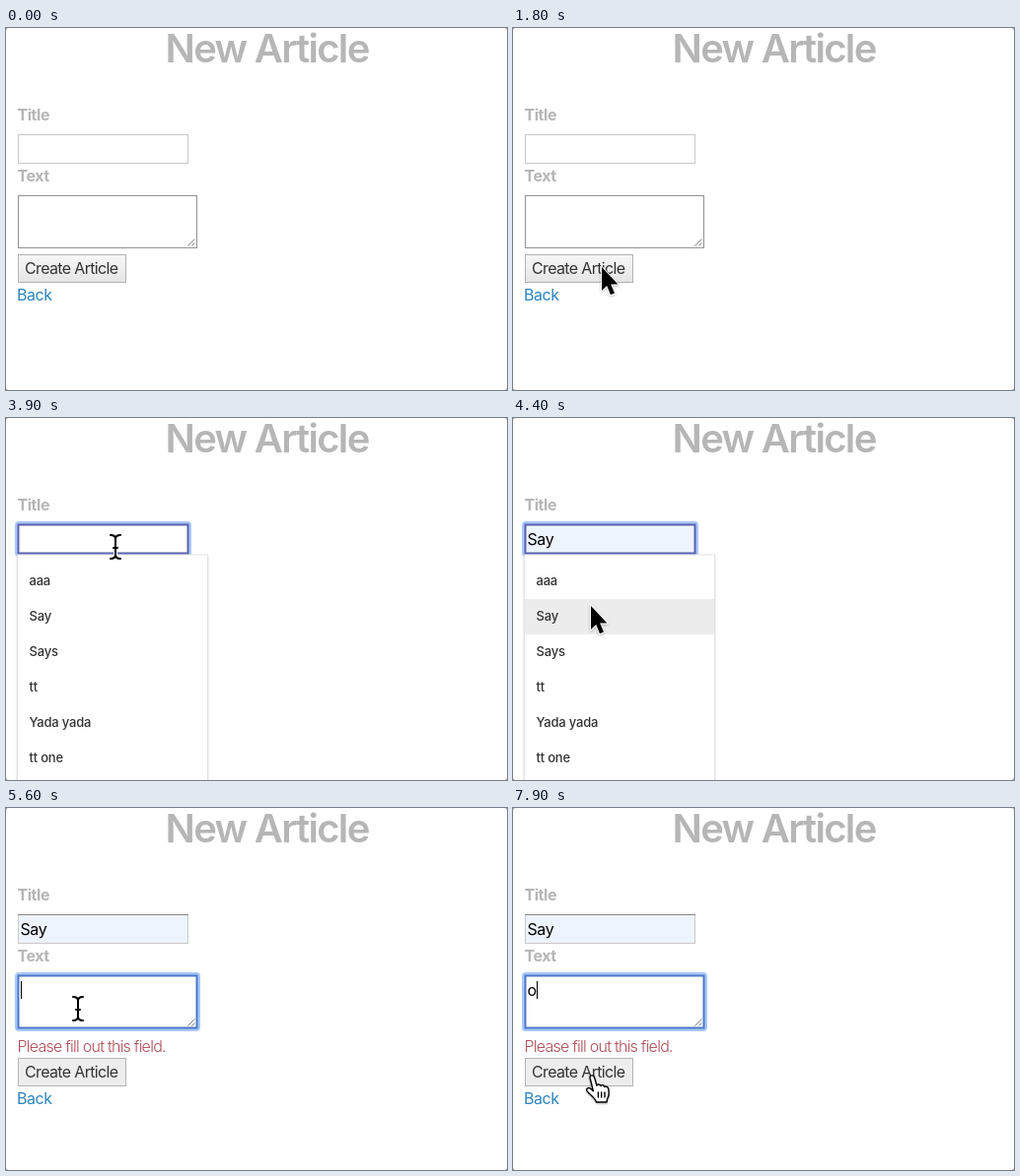
An HTML page that plays this animation: 508x368 px, repeating every 8000 ms.

```html
<!DOCTYPE html>
<html lang="en">
<head>
<meta charset="utf-8">
<title>New Article</title>
<style>
  html, body { margin: 0; width: 100%; height: 100%; overflow: hidden; background: #a6a6a6; }
  svg { display: block; width: 508px; height: 368px; }
  text { font: 16px Inter, "Open Sans", sans-serif; font-optical-sizing: none; white-space: pre; }
  .head { font-size: 40px; font-weight: 600; letter-spacing: -1.7px; fill: #b6b6b6; }
  .label { font-weight: 700; letter-spacing: -.45px; fill: #b6b6b6; }
  .error { font-weight: 300; letter-spacing: -.75px; fill: #b04c58; }
  .button { letter-spacing: -.65px; fill: #333; }
  .link { letter-spacing: -.45px; fill: #2b84bd; }
  .value { letter-spacing: -.4px; fill: #000; }
  .option { font-size: 13px; font-weight: 500; letter-spacing: -.2px; fill: #333; }
</style>
</head>
<body>
<svg viewBox="0 0 508 368">
  <defs>
    <linearGradient id="face" x2="0" y2="1">
      <stop stop-color="#f7f7f7"/><stop offset="1" stop-color="#e5e5e5"/>
    </linearGradient>
    <filter id="soft" x="-50%" y="-50%" width="200%" height="200%">
      <feDropShadow dx="0" dy="1" stdDeviation="1" flood-opacity=".3"/>
    </filter>
    <filter id="lift" x="-10%" y="-10%" width="120%" height="120%">
      <feDropShadow dx="0" dy="1" stdDeviation="1" flood-opacity=".16"/>
    </filter>
  </defs>
  <rect width="508" height="368" rx="3" fill="#fff"/>
  <text class="head" x="161.5" y="35">New Article</text>
  <text class="label" x="11.5" y="94">Title</text>

  <g id="title">
    <rect class="glow" x="10.5" y="106.5" width="176" height="33" rx="2.5" fill="none" stroke="#a9c8f6" stroke-width="3"/>
    <rect class="box" x="12.5" y="108.5" width="172" height="29"/>
    <path class="inset" d="M12 108.5H185" stroke="#858585"/>
    <text class="value" x="14.5" y="129"></text>
  </g>
  <text id="titleError" class="error" x="11.5" y="156">Please fill out this field.</text>

  <g id="textPart">
    <text class="label" x="11.5" y="156">Text</text>
    <rect class="glow" x="10.5" y="168.5" width="185" height="57" rx="2.5" fill="none" stroke="#a9c8f6" stroke-width="3"/>
    <rect class="box" x="12.5" y="170.5" width="181" height="53" fill="#fff"/>
    <path d="M184.5 221.5L191.5 214.5M188.5 221.5L191.5 218.5" stroke="#777" stroke-width=".9"/>
    <text class="value" x="14.5" y="191"></text>
    <path class="caret" stroke="#000"/>
    <text id="textError" class="error" x="11.5" y="248">Please fill out this field.</text>
  </g>

  <g id="actions">
    <rect class="box" x="12.5" y="230.5" width="109" height="28" stroke="#b3b3b3"/>
    <text class="button" x="19" y="250">Create Article</text>
    <text class="link" x="11" y="277">Back</text>
  </g>

  <g id="menu">
    <rect x="11.5" y="139" width="193" height="240" fill="#fff" stroke="#dedede" stroke-width=".8" filter="url(#lift)"/>
    <rect id="hover" x="12" width="192" height="36" fill="#ececec"/>
  </g>

  <g id="arrow" filter="url(#soft)">
    <path d="M0 0V24L5.2 19 9 28.3 13 26.6 9.2 17.5H16.4Z" stroke="#fff" stroke-width="1.8" paint-order="stroke"/>
  </g>
  <g id="beam" fill="none" stroke-linecap="round">
    <path stroke="#fff" stroke-width="4"/>
    <path stroke="#000" stroke-width="2"/>
  </g>
  <g id="hand" filter="url(#soft)" stroke="#000" stroke-width="1.4" stroke-linejoin="round" stroke-linecap="round">
    <path fill="#fff" d="M-2 2C-2.2-.6 1.6-1 2.5 1.8L5 10.2C5.6 8.4 8.4 8.6 8.9 10.6 9.8 9 12.3 9.4 12.7 11.5 14 10.4 16.6 11.4 16.9 14L17.2 18.5C17.2 22 15 23.5 15 27H4.5C4 23.5-1.6 20-5 15.6-6.2 13-3.4 11.4-1 13.6L1.4 15.8Z"/>
    <path fill="none" d="M6.4 17V22M9.7 17V22M13 17V22"/>
  </g>
</svg>
<script>
const LOOP = 8000, STEP = 100;
const OPTIONS = ['aaa', 'Say', 'Says', 'tt', 'Yada yada', 'tt one'];
const ROW_TOP = 148, ROW = 36;
const $ = q => document.querySelector(q);
const show = (el, on) => el.setAttribute('visibility', on ? 'inherit' : 'hidden');
const set = (el, attrs) => { for (const k in attrs) el.setAttribute(k, attrs[k]); };

// Pointer stops: time, x, y, shape from that time on
const PATH = [
  [800, 201, 345, 'arrow'], [900, 160, 305, 'arrow'], [1000, 125, 272, 'arrow'],
  [1100, 105, 254, 'arrow'], [1200, 94, 246, 'arrow'], [1300, 90, 243, 'arrow'],
  [2800, 90, 243, 'arrow'], [2900, 92, 215, 'beam'], [3000, 99, 160, 'beam'],
  [3100, 104, 123, 'beam'], [3300, 108, 115, 'beam'], [3700, 111, 131, 'beam'],
  [4100, 111, 131, 'beam'], [4200, 104, 150, 'arrow'], [4300, 91, 174, 'arrow'],
  [4400, 79, 191, 'arrow'], [4500, 73, 196, 'arrow'], [4900, 73, 196, 'arrow'],
  [5000, 74, 198, 'beam'], [5300, 73, 204, 'beam'], [6800, 73, 204, 'none'],
  [7200, 73, 206, 'beam'], [7400, 75, 236, 'beam'], [7500, 77, 262, 'hand'],
  [7700, 79, 281, 'hand'], [7900, 80, 272, 'hand']
];

function pointer(t) {
  const i = PATH.findLastIndex(p => p[0] <= t);
  if (i < 0) return { x: 0, y: 0, shape: 'none' };
  const [t0, x0, y0, shape] = PATH[i];
  const [t1, x1, y1] = PATH[i + 1] || [LOOP, x0, y0];
  const k = (t - t0) / (t1 - t0);
  return { x: x0 + (x1 - x0) * k, y: y0 + (y1 - y0) * k, shape };
}

const menu = $('#menu'), hover = $('#hover');
OPTIONS.forEach((word, i) => {
  const el = document.createElementNS('http://www.w3.org/2000/svg', 'text');
  set(el, { class: 'option', x: 23.5, y: ROW_TOP + 22 + i * ROW });
  el.textContent = word;
  menu.append(el);
});
for (const p of document.querySelectorAll('#beam path'))
  p.setAttribute('d', 'M-5-12Q0-12 0-8V8Q0 12-5 12M5-12Q0-12 0-8M0 8Q0 12 5 12M-2 1H2');

function field(id, { focus, stroke, fill, value }) {
  show($(id + ' .glow'), focus);
  set($(id + ' .box'), { stroke, fill, 'stroke-width': focus ? 2 : 1 });
  $(id + ' .value').textContent = value;
}

function draw(time) {
  const t = Math.floor(time / STEP) * STEP;
  const titleBad = t >= 2300 && t < 5600, textBad = t >= 2300;
  const writing = t >= 5600, filled = t >= 4700, typed = t >= 6800;
  const open = t >= 3800 && t < 4700;
  const at = pointer(t);

  const row = open && at.shape === 'arrow' ? Math.floor((at.y - ROW_TOP) / ROW) : -1;
  const value = filled ? 'Say' : OPTIONS[row] || '';
  field('#title', {
    focus: titleBad, value,
    stroke: titleBad ? (filled ? '#5069b8' : '#5961b0') : '#c9c9c9',
    fill: value ? '#edf4fe' : '#fff'
  });
  show($('#title .inset'), writing);
  show($('#titleError'), titleBad);

  field('#textPart', {
    focus: writing, value: typed ? 'o' : '', fill: '#fff',
    stroke: writing ? '#4a78cc' : textBad ? '#b1606b' : '#929292'
  });
  show($('#textError'), textBad);
  const blinkStart = typed ? 6900 : 5600;
  show($('.caret'), writing && Math.floor(Math.max(0, t - blinkStart) / 500) % 2 === 0);
  $('.caret').setAttribute('d', `M${typed ? 24.5 : 15.5} 176V194`);

  const shift = titleBad ? 24 : 0;
  $('#textPart').setAttribute('transform', `translate(0 ${shift})`);
  $('#actions').setAttribute('transform', `translate(0 ${shift + (textBad ? 24 : 0)})`);
  $('#actions .box').setAttribute('fill', writing ? '#ededed' : 'url(#face)');

  show(menu, open);
  show(hover, row >= 0);
  hover.setAttribute('y', ROW_TOP + Math.max(0, row) * ROW);

  for (const shape of ['arrow', 'beam', 'hand']) {
    const el = $('#' + shape);
    show(el, at.shape === shape);
    el.setAttribute('transform', `translate(${at.x} ${at.y})`);
  }
}

let start;
function tick(now) {
  start ??= now;
  draw((now - start) % LOOP);
  requestAnimationFrame(tick);
}
draw(0);
requestAnimationFrame(tick);
</script>
</body>
</html>
```
